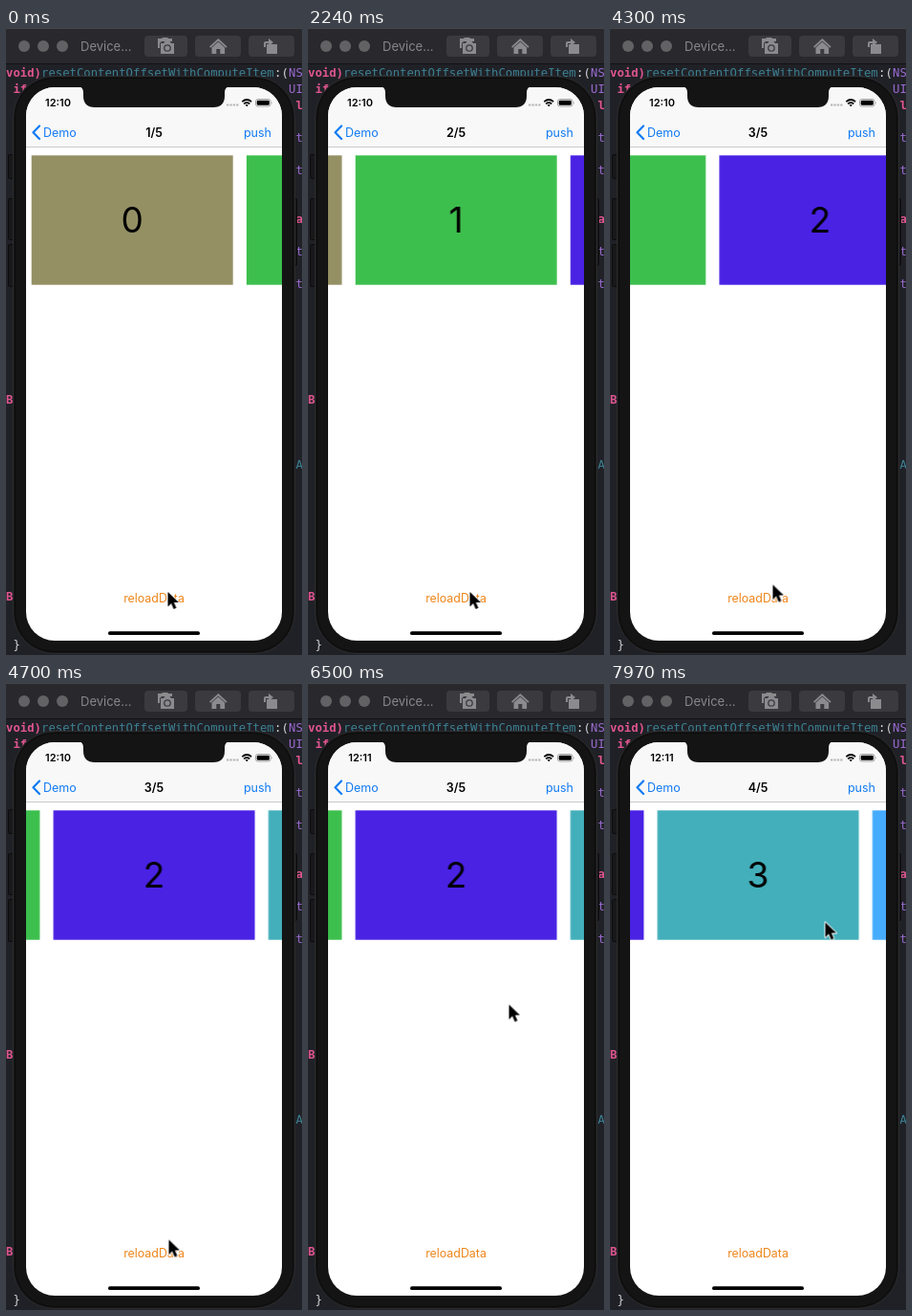
Recreate the animation shown at these times as an HTML page. Size 310x656 px, loop 8000 ms.

```html
<!DOCTYPE html>
<html lang="en">
<head>
<meta charset="utf-8">
<title>Carousel demo</title>
<style>
  html, body { margin: 0; width: 100%; height: 100%; overflow: hidden; background: #202127; }
  svg { display: block; }
  .stage { width: 100vw; height: 100vh; }
  text { font-family: Inter, sans-serif; white-space: pre; }
  .code text { font: 12.27px "DejaVu Sans Mono", monospace; fill: #9a6bd0; }
  .code .key { font-weight: 700; fill: #e0558f; }
  .code .call { fill: #3c8191; }
  .code .plain { fill: #d6d6d8; }
  .bar { font-size: 12.5px; fill: #127bf3; }
  .title { font-size: 12.5px; font-weight: 600; text-anchor: middle; }
  .clock { font-size: 11px; font-weight: 600; text-anchor: middle; }
  .card text { font-size: 37px; text-anchor: middle; }

  .track, .pages, .time, .cursor { animation: 8s linear infinite; }
  .track { animation-name: scroll; }
  .pages { animation-name: pages; animation-timing-function: step-end; }
  .time { animation-name: minute; animation-timing-function: step-end; }
  .cursor { animation-name: pointer; }

  @keyframes scroll {
    0% { transform: none; }
    20.6% { transform: none; animation-timing-function: ease-in-out; }
    24.6%, 51.25% { transform: translateX(-202.3px); animation-timing-function: ease-in-out; }
    55.25%, 87.5% { transform: translateX(-427.5px); animation-timing-function: ease-in-out; }
    91.5%, 100% { transform: translateX(-652.7px); }
  }
  @keyframes pages {
    0% { transform: none; }
    22.6% { transform: translateY(-30px); }
    53.25% { transform: translateY(-60px); }
    89.5%, 100% { transform: translateY(-90px); }
  }
  @keyframes minute {
    0% { transform: none; }
    70%, 100% { transform: translateY(-30px); }
  }
  @keyframes pointer {
    0%, 38.5% { transform: translate(169.5px, 590px); }
    40%, 69% { transform: translate(170.5px, 582.5px); animation-timing-function: ease-in-out; }
    75.5%, 83% { transform: translate(210.5px, 336.5px); animation-timing-function: ease-in-out; }
    88%, 100% { transform: translate(225.5px, 250.5px); }
  }
</style>
</head>
<body>
<svg class="stage" viewBox="0 0 310 656">
  <defs>
    <clipPath id="screen"><rect x="21" y="62" width="268" height="579" rx="30"/></clipPath>
  </defs>
  <rect width="310" height="656" fill="#202127"/>

  <g class="code">
    <text x="0" y="51" class="key">void)</text>
    <text x="37" y="51" class="call">resetContentOffsetWithComputeItem</text>
    <text x="281" y="51" class="plain">:(</text>
    <text x="296" y="51">NS</text>
    <text x="7.4" y="68" class="key">if</text>
    <text x="296" y="68">UI</text>
    <text x="303.5" y="85" class="key">l</text>
    <text x="303.5" y="119">t</text>
    <text x="303.5" y="153">t</text>
    <text x="303.5" y="204" class="key">a</text>
    <text x="303.5" y="238">t</text>
    <text x="303.5" y="272">t</text>
    <text x="303.5" y="461" class="call">A</text>
    <text x="0" y="393" class="key">B</text>
    <text x="0" y="599" class="key">B</text>
    <text x="7.5" y="649" class="plain">}</text>
  </g>

  <g fill="#19191b" stroke="#0c0c0d">
    <rect x="2.5" y="132.5" width="7" height="25" rx="1.5"/>
    <rect x="2.5" y="178.5" width="7" height="43" rx="1.5"/>
    <rect x="2.5" y="226.5" width="7" height="44" rx="1.5"/>
    <rect x="300.5" y="178.5" width="4" height="70" rx="1.5"/>
  </g>
  <rect x="7.5" y="50.5" width="295" height="604" rx="43" fill="#151516" stroke="#2b2b2d"/>
  <rect x="9.5" y="52.5" width="291" height="600" rx="41" fill="#141415" stroke="#0c0c0d"/>

  <g clip-path="url(#screen)">
    <rect x="21" y="62" width="268" height="579" fill="#fff"/>
    <g class="track" id="track"></g>
    <rect x="21" y="62" width="268" height="62" fill="#f8f8f8"/>
    <path d="M21 124.5h268" stroke="#c9c9cb"/>
    <path d="M76 61q5 1 5 7v3q0 12 12 12h124q12 0 12-12v-3q0-6 5-7z" fill="#141415"/>

    <svg x="35" y="68" width="42" height="20">
      <g class="time clock"><text x="19.5" y="14">12:10</text><text x="19.5" y="44">12:11</text></g>
    </svg>
    <g fill="#b5b5b7">
      <rect x="231" y="79.5" width="2.3" height="2"/><rect x="234.4" y="79.5" width="2.3" height="2"/>
      <rect x="237.8" y="79.5" width="2.3" height="2"/><rect x="241.2" y="79.5" width="2.3" height="2"/>
    </g>
    <g fill="none" stroke="#000" stroke-width="1.7">
      <path d="M247.3 77.1q4.9-4.2 9.8 0M249.1 79.3q3.1-2.5 6.2 0"/>
      <path d="M250.6 80.6q1.6-1.2 3.2 0l-1.6 1.7z" fill="#000" stroke="none"/>
    </g>
    <rect x="261.5" y="74.5" width="15.5" height="7.5" rx="2.2" fill="none" stroke="#8c8c8e" stroke-width=".8"/>
    <rect x="262.7" y="75.7" width="13.1" height="5.1" rx="1.2"/>
    <path d="M278 77q1.3 1.2 0 2.6z" fill="#8c8c8e"/>

    <path d="M35 102.5l-6.5 6.7 6.5 6.7" fill="none" stroke="#127bf3" stroke-width="2.2" stroke-linecap="round" stroke-linejoin="round"/>
    <text class="bar" x="39" y="113.7" font-size="12.4">Demo</text>
    <svg x="125" y="98" width="60" height="22">
      <g class="pages title">
        <text x="30" y="15.5">1/5</text><text x="30" y="45.5">2/5</text>
        <text x="30" y="75.5">3/5</text><text x="30" y="105.5">4/5</text>
      </g>
    </svg>
    <text class="bar" x="278" y="113.7" text-anchor="end">push</text>

    <text x="155" y="600.5" font-size="12.4" text-anchor="middle" fill="#ee861b">reloadData</text>
    <rect x="107" y="631.3" width="96" height="3.7" rx="1.85"/>
  </g>

  <rect width="310" height="38" fill="#29292d"/>
  <path d="M0 .5h310" stroke="#454549"/>
  <path d="M0 37.5h310" stroke="#111114"/>
  <g fill="#626265">
    <circle cx="19" cy="19" r="6"/><circle cx="39" cy="19" r="6"/><circle cx="59" cy="19" r="6"/>
  </g>
  <text x="78" y="24" font-size="13" fill="#88888b">Device...</text>
  <g fill="#3b3b3f">
    <rect x="145" y="8" width="45" height="22" rx="4"/>
    <rect x="198" y="8" width="48" height="22" rx="4"/>
    <rect x="254" y="8" width="48" height="22" rx="4"/>
  </g>
  <g fill="#8b8b8e">
    <path d="M159 11h4l1-1h5l1 1h4v3h-11l-2 2v5h-2z"/>
    <path d="M162 16h3l1.5-2h5l1.5 2h3v11h-14z"/>
    <circle cx="169" cy="21" r="3.2" fill="none" stroke="#3b3b3f" stroke-width="1.3"/>
    <path d="M213 19.5l9.3-8.5 9.3 8.5-1.2 1.2-8.1-7.3-8.1 7.3z"/>
    <path d="M215.5 20.5l6.8-6.1 6.8 6.1v6.5h-4.8v-5h-4v5h-4.8z"/>
    <rect x="273" y="17" width="11" height="10"/>
    <path d="M270 20v-4q0-2 2-2h3v-3l5 4-5 4v-3h-3v4z"/>
  </g>

  <g class="cursor">
    <path d="M0 0v15.5l3.6-3.4 2.5 5.8 2.8-1.2-2.5-5.6h5z" stroke="#fff" stroke-width="1.8" stroke-linejoin="round" paint-order="stroke"/>
  </g>
</svg>
<script>
  const colors = ["#949064", "#3dbf4d", "#4922e4", "#43afbb", "#46acfd"];
  const pitch = 225.2;
  document.getElementById("track").innerHTML = colors.map((color, i) =>
    `<g class="card" transform="translate(${26.7 + i * pitch} 133.3)">
      <rect width="211" height="135.4" fill="${color}"/>
      <text x="105.5" y="81.2">${i}</text>
    </g>`).join("");
</script>
</body>
</html>
```
